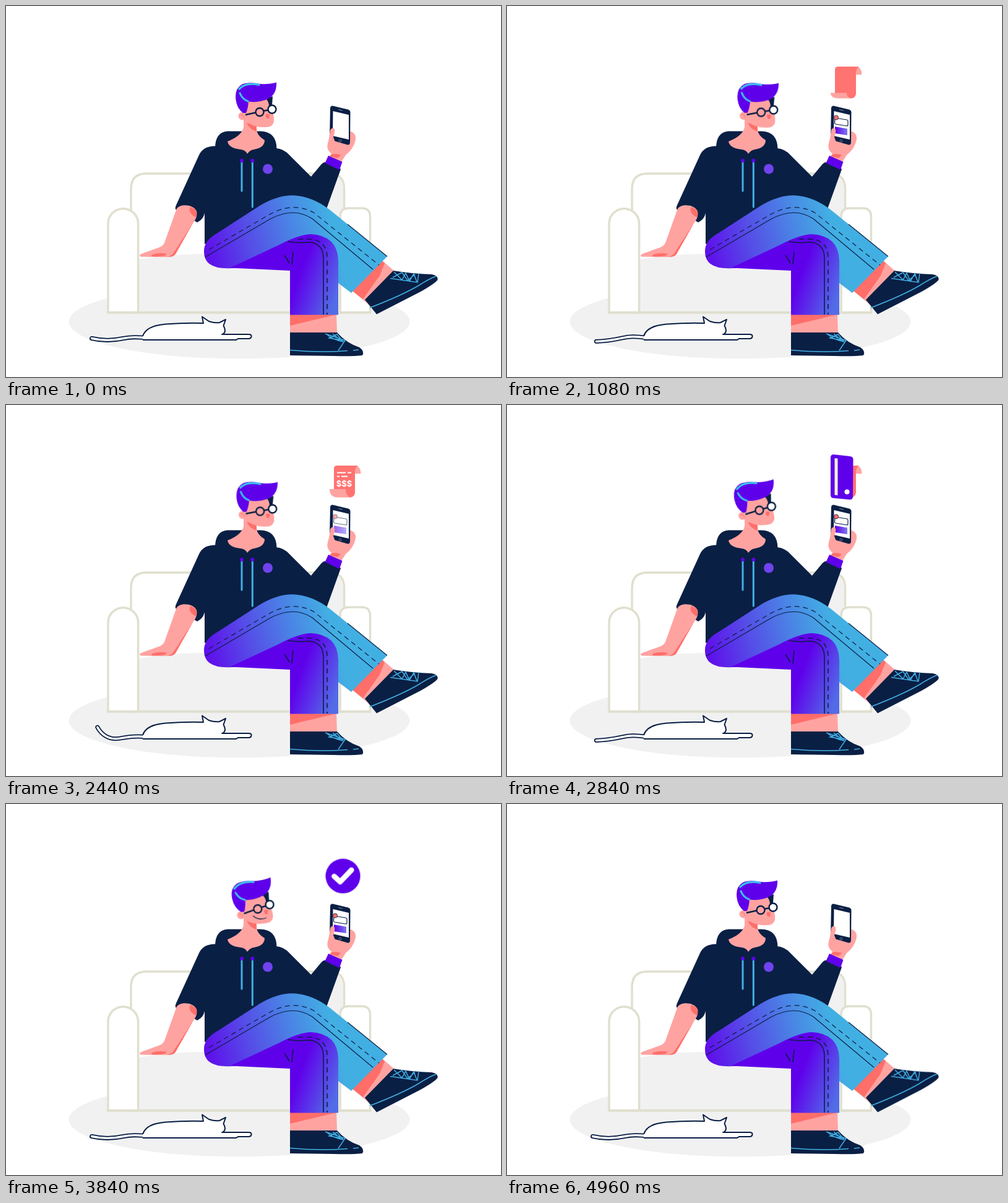
Write an HTML page without scripts that moves like this. It is 800 by 600 pixels and loops after 5000 ms.

```html
<!DOCTYPE html>
<html lang="en">
<head>
<meta charset="utf-8">
<title>Paying from the sofa</title>
<style>
  :root { --navy: #0a1f44; --violet: #5f00eb; --blue: #42afe3; --skin: #ffa3a1; --coral: #ff6e69; --sand: #e0dfcf; --mist: #f1f1f1; }
  html, body { margin: 0; width: 100%; height: 100%; overflow: hidden; background: #fff; }
  svg { display: block; width: 100%; height: 100%; }

  .navy { fill: var(--navy); }
  .violet { fill: var(--violet); }
  .skin { fill: var(--skin); }
  .coral { fill: var(--coral); }
  .mist { fill: var(--mist); }
  .white { fill: #fff; }
  .line { fill: none; stroke: var(--navy); stroke-width: 1.6; }
  .thin { stroke-width: 1.2; }
  .bold { stroke-width: 2.4; }
  .thread { fill: none; stroke: var(--blue); stroke-width: 1.5; }
  .sofa { fill: #fff; stroke: var(--sand); stroke-width: 3.5; }
  .dash { stroke-dasharray: 8 6; }

  .anim, .tail { animation: 5s ease-in-out infinite; }
  .head { transform-origin: 395px 195px; animation-name: nod; }
  .mouth { animation-name: smile; }
  .foot { transform-origin: 583px 470px; animation-name: tap; }
  .tail { fill: none; stroke-linecap: round; animation-name: wag; }
  .screen { animation-name: screen; }
  .receipt { transform-origin: 545px 150px; animation-name: receipt; }
  .curl { transform-origin: 545px 149.5px; animation-name: curl; }
  .row { transform-origin: 535px 112px; animation-name: row; }
  .price { transform-origin: 546px 127px; animation-name: price; }
  .card { transform-origin: 541px 118px; animation-name: card; }
  .coin { animation-name: coin; }
  .check { transform-origin: 544.5px 116.5px; animation-name: check; }

  @keyframes nod {
    0%, 98.4%, 100% { transform: none; }
    9.6%, 51.2% { transform: rotate(1.6deg); }
    60%, 88.8% { transform: rotate(-7.5deg); }
  }
  @keyframes smile {
    0%, 56%, 97%, 100% { stroke-dashoffset: 1; opacity: 0; }
    58% { opacity: .5; }
    68%, 90% { stroke-dashoffset: 0; opacity: 1; }
  }
  @keyframes tap {
    0%, 21.6%, 44.8%, 76.8%, 100% { transform: none; }
    33.2%, 88.4% { transform: rotate(-15.7deg); }
  }
  @keyframes wag {
    0%, 34.4%, 35.2%, 69.6%, 100% { d: path("M138.5 537.5C158 542 174 541 190 537.5S212 536 226 536.5"); }
    11.5%, 46.7% { d: path("M148 520C153 531 165 542 182 539.5S208 535 226 536.5"); }
    27.2%, 62.4% { d: path("M143 550.5C160 546 172 540 188 536S210 535 226 536.5"); }
  }
  @keyframes screen {
    0%, 2.4%, 93%, 100% { opacity: 0; }
    9.6%, 45.6%, 53%, 86.5% { opacity: 1; }
    49% { opacity: .6; }
  }
  @keyframes receipt {
    0%, 12% { transform: translateY(34px) scale(0); opacity: 1; }
    17.5% { transform: translateY(-18px); }
    21%, 58% { transform: none; opacity: 1; }
    66%, 99.9% { transform: none; opacity: 0; }
    100% { transform: translateY(34px) scale(0); opacity: 0; }
  }
  @keyframes curl {
    0%, 19.5% { transform: scaleY(.4); }
    24%, 100% { transform: none; }
  }
  @keyframes row {
    0%, 24% { transform: scaleX(0); }
    32.5%, 100% { transform: none; }
  }
  @keyframes price {
    0%, 32.5% { transform: scale(0); }
    36.4%, 100% { transform: none; }
  }
  @keyframes card {
    0%, 48.8% { transform: translateY(36px) scale(0); }
    56%, 68% { transform: none; }
    73%, 100% { transform: scale(0); }
  }
  @keyframes coin {
    0%, 56.8% { transform: translate(var(--dx), 24px); opacity: 0; }
    57.5% { opacity: 1; }
    62.5% { transform: none; opacity: 1; }
    64% { transform: none; opacity: .9; }
    67.2%, 100% { transform: none; opacity: 0; }
  }
  @keyframes check {
    0%, 71.5% { transform: scale(0); opacity: 1; }
    79% { transform: scale(1.08); }
    82.5%, 90% { transform: none; opacity: 1; }
    97.5%, 100% { transform: translateY(-25px); opacity: 0; }
  }
</style>
</head>
<body>
<svg viewBox="0 0 800 600" preserveAspectRatio="none">
  <defs>
    <linearGradient id="thigh" gradientUnits="userSpaceOnUse" x1="325" y1="403" x2="525" y2="350">
      <stop stop-color="#5f0feb"/><stop offset=".35" stop-color="#554ee7"/>
      <stop offset=".7" stop-color="#4a86e5"/><stop offset="1" stop-color="#42afe3"/>
    </linearGradient>
    <linearGradient id="shin" gradientUnits="userSpaceOnUse" x1="477" y1="428" x2="541" y2="452">
      <stop stop-color="#5f00eb"/><stop offset="1" stop-color="#526ce6"/>
    </linearGradient>
    <linearGradient id="button">
      <stop stop-color="#5f00eb"/><stop offset="1" stop-color="#7d78ec"/>
    </linearGradient>
  </defs>

  <ellipse class="mist" cx="377" cy="510.5" rx="275.5" ry="60"/>

  <!-- sofa -->
  <path class="sofa" d="M202 496V296Q202 271 227 271H522Q546.5 271 546.5 296V496Z"/>
  <path class="mist" d="M430 273H522Q545 273 545 296V494H430Z"/>
  <path class="mist" d="M214 410Q265 401 322 401L540 420V495H214Z"/>
  <path class="sofa" d="M540 496V341Q540 327 554 327H575Q588.5 327 588.5 341V496Z"/>
  <path class="sofa" d="M165 496V352A24.3 24.3 0 0 1 213.6 352V496Z"/>
  <path d="M163 495.5H590" stroke="var(--sand)" stroke-width="3.5"/>

  <!-- cat -->
  <path class="tail" stroke="var(--navy)" stroke-width="7" d="M138.5 537.5C158 542 174 541 190 537.5S212 536 226 536.5"/>
  <path class="white" stroke="var(--navy)" stroke-width="2" stroke-linejoin="round"
    d="M221 534Q226 517 258 514.5T319 513L317 502.5L328 510Q337 513 345 512L355 507L351.5 517Q357 527 350 531H392Q397 531 396.5 534.5Q396 538 392 538H375L372 540H221"/>
  <path class="line" d="M348 531H390"/>
  <path class="tail" stroke="#fff" stroke-width="3.4" d="M138.5 537.5C158 542 174 541 190 537.5S212 536 226 536.5"/>

  <!-- hoodie -->
  <path class="navy" d="M345 227Q320 224 312 241L275 322Q272 329 276 330L309 350Q319 345 321 335V385L518 328L541 264Q540 261 520 253Q513 251 508 258L493 276L458 241Q449 231 436 230Z"/>
  <path class="navy" d="M338 230Q338 204 358 202.5H411Q437 203 437.5 231Z"/>
  <path class="skin" d="M384 178V196Q381 210 358 219Q360 230 379 232Q387 233 390 239Q394 233 401 232Q418 229 418 217Q406 210 405 200V180Z"/>
  <path class="coral" d="M389 189L405 194V203Q394 200 389 189Z"/>
  <path d="M381 250V299M398.3 250V325" stroke="var(--blue)" stroke-width="3" stroke-linecap="round"/>
  <circle class="violet" cx="381" cy="250" r="3"/>
  <circle class="violet" cx="398.3" cy="250" r="3"/>
  <circle cx="423" cy="263.5" r="8" fill="#7043ee"/>

  <!-- resting arm -->
  <path class="skin" d="M275 330C278 319 303 320 308 332Q310 341 303 350L274 401Q271 406 263 406L218 405.5Q213 403 221 400L246 391Q253 389 256 383Z"/>
  <path class="coral" d="M298 325Q293 335 307 342Q310 333 304 328ZM301 353L274 401Q271 406 261 405.5Q268 404 271 399ZM236 402Q248 398 260 401Q258 406 235 405Z"/>

  <!-- phone hand -->
  <path class="skin" d="M554 202Q566 204 565 216Q562 231 549 241L542 252L522 244L526 239Q517 232 520 222L526 200Z"/>
  <path class="coral" d="M526 240Q534 238 541 241L536 246L524 243Z"/>
  <path class="violet" d="M521 242L543.5 252L539 265L515.5 254Z"/>
  <path class="navy" d="M528 161.5L553 167.5Q556.5 168.5 556.5 172L556 221Q555.5 225 552 224.5L526 217Q523 216 523 213L524 165Q524.5 161 528 161.5Z"/>
  <path class="white" d="M528.5 170L554 176V216L528 210Z"/>
  <path d="M537 167.5L544 169" stroke="#7f8ba5"/>
  <circle cx="540" cy="218" r="2" fill="none" stroke="#7f8ba5" stroke-width=".8"/>
  <g class="anim screen">
    <path class="line thin" d="M530 181L549 184Q551 184.5 551 186V192Q551 194 549 194L531 191Q529.5 190.5 529.5 189Z"/>
    <circle class="coral" cx="532" cy="180.5" r="3.6" stroke="var(--navy)" stroke-width=".8"/>
    <path fill="url(#button)" d="M530 195L550 198.5V209L530 206Z"/>
  </g>
  <path class="skin" d="M524 201Q526 196 530 198Q532 200 531 205L529 212L532 220L530 232L520 228Z"/>

  <!-- raised foot -->
  <g class="anim foot">
    <path class="skin" d="M590 396L629 430L590 486L554 456Z"/>
    <path class="coral" d="M590 396L612 416L604 436L577 474L554 456Z"/>
    <path class="navy" d="M626 428Q656 433 688 434Q699 436 697.5 443Q693 449 670 462L599 498.5L580 475Z"/>
    <path class="thread" d="M588 488Q640 468 667 452Q684 441 695 437M621 440.5L665 447L667 432M627 430L640 443L646 432L652 445L659 433L664 446M625 439L640 431L649 444L661 434"/>
  </g>

  <!-- legs -->
  <path fill="url(#thigh)" d="M320 396Q320 379 342 367L410 323Q444 303 472 307Q502 311 530 335L616 405L558 464L500 420L365 424Q319 427 320 396Z"/>
  <path class="line thin" d="M552 353L616 405"/>
  <path class="line thin" d="M322 406L426 345Q464 324 495 344L593 426"/>
  <path class="line thin dash" d="M328 394L426 337Q464 316 497 334L603 419"/>

  <path class="skin" d="M459 498H534L535 530H459Z"/>
  <path class="coral" d="M459 499H534L459 517Z"/>
  <path fill="url(#shin)" d="M362 423.5L440 387Q472 370 492 369Q536 371 537 412V499.5H459V428Z"/>
  <path class="line" d="M456 381Q470 384 490 382Q513 384 513 408V499"/>
  <path class="line dash" d="M472 377H490Q519 378 519 408V499"/>
  <path class="line" d="M450 403L458 416M464 397L462 418"/>
  <path class="navy" d="M459 528H535Q550 545 571 552Q580 558 576 565Q560 567 530 566L459 565Z"/>
  <path class="thread" d="M459 556.5Q510 561 552 557.5M561 557L570 556M516 530L548 541L537 557M517 530Q528 540 545 543M528 530L540 540L522 537L535 531L545 543"/>

  <!-- head -->
  <g class="anim head">
    <circle class="skin" cx="382" cy="178" r="6.5"/>
    <path class="skin" d="M386 152L427 148L428 163Q434 177 433 187Q431 196 420 196Q402 197 392 189Q386 184 385 176Z"/>
    <path d="M379 176Q384 175 385 181" fill="none" stroke="var(--coral)"/>
    <path class="coral" d="M420 175H426L425 182Q419 183 420 175Z"/>
    <path class="navy" d="M420 150L431 146L430 160L425 163Q425 154 420 150Z"/>
    <path class="violet" d="M371.5 152Q369 134 381 127Q391 122 411 126Q426 127 437 123.5Q438 142 424 150Q409 157 392 154.5Q391 166 388 173H383Q373 165 371.5 152Z"/>
    <path d="M377 134Q388 123 409 127.5M378 141Q382 151 391 154" fill="none" stroke="#3bc0ee" stroke-width="3.2" stroke-linecap="round"/>
    <path class="line bold" d="M387 176L403 172.5M417 169.5L423 168.5"/>
    <circle class="line bold" cx="410" cy="171.5" r="6.5"/>
    <circle class="line bold" style="fill:#fff" cx="430" cy="167" r="6.5"/>
    <path class="line thin anim mouth" pathLength="1" stroke-dasharray="1" d="M401 181.5Q409 191 422 187.5"/>
  </g>

  <!-- receipt -->
  <g class="anim receipt">
    <path class="skin" d="M563 98Q573 98 573.5 111H563Z"/>
    <path fill="#ff7371" d="M535 98H569Q564 101 564 108V142Q563 149.5 555 149.5L530 142V103Q530 98 535 98Z"/>
    <path class="skin anim curl" d="M523 136H549Q549 148 557 149.5H536Q523 149 523 136Z"/>
    <path class="anim row" d="M535 109.5H549M552 109.5H558M535 115.5H539M542 115.5H552" stroke="#fff" stroke-width="2.2"/>
    <text class="white anim price" x="546.5" y="132" text-anchor="middle" font-family="Inter, sans-serif" font-size="13" font-weight="700">$$$</text>
  </g>

  <!-- card and coins -->
  <g fill="#ebe9db">
    <circle class="anim coin" style="--dx:24px" cx="509" cy="79.5" r="7.5"/>
    <circle class="anim coin" style="--dx:-24px" cx="570.5" cy="79.5" r="7.5"/>
  </g>
  <g fill="#ffbd80">
    <circle class="anim coin" style="--dx:10px" cx="523" cy="76" r="7.5"/>
    <circle class="anim coin" style="--dx:-10px" cx="557.5" cy="76.5" r="7.5"/>
  </g>
  <g class="anim card">
    <path class="violet" d="M528 80L555 83Q559.5 84 559.5 88L559 148Q559 153 554 153L527 150.5Q523 150 523 145V85Q523 80 528 80Z"/>
    <path fill="#efeddf" d="M529.5 86L534.5 86.5V146L529.5 145.5Z"/>
    <circle class="white" cx="549.5" cy="140.5" r="4"/>
  </g>

  <g class="anim check">
    <circle class="violet" cx="544.5" cy="116.5" r="31.5"/>
    <path d="M528.5 117L539.5 127L560 105.5" fill="none" stroke="#fff" stroke-width="9.5" stroke-linejoin="round" stroke-linecap="round"/>
  </g>
</svg>
</body>
</html>
```
